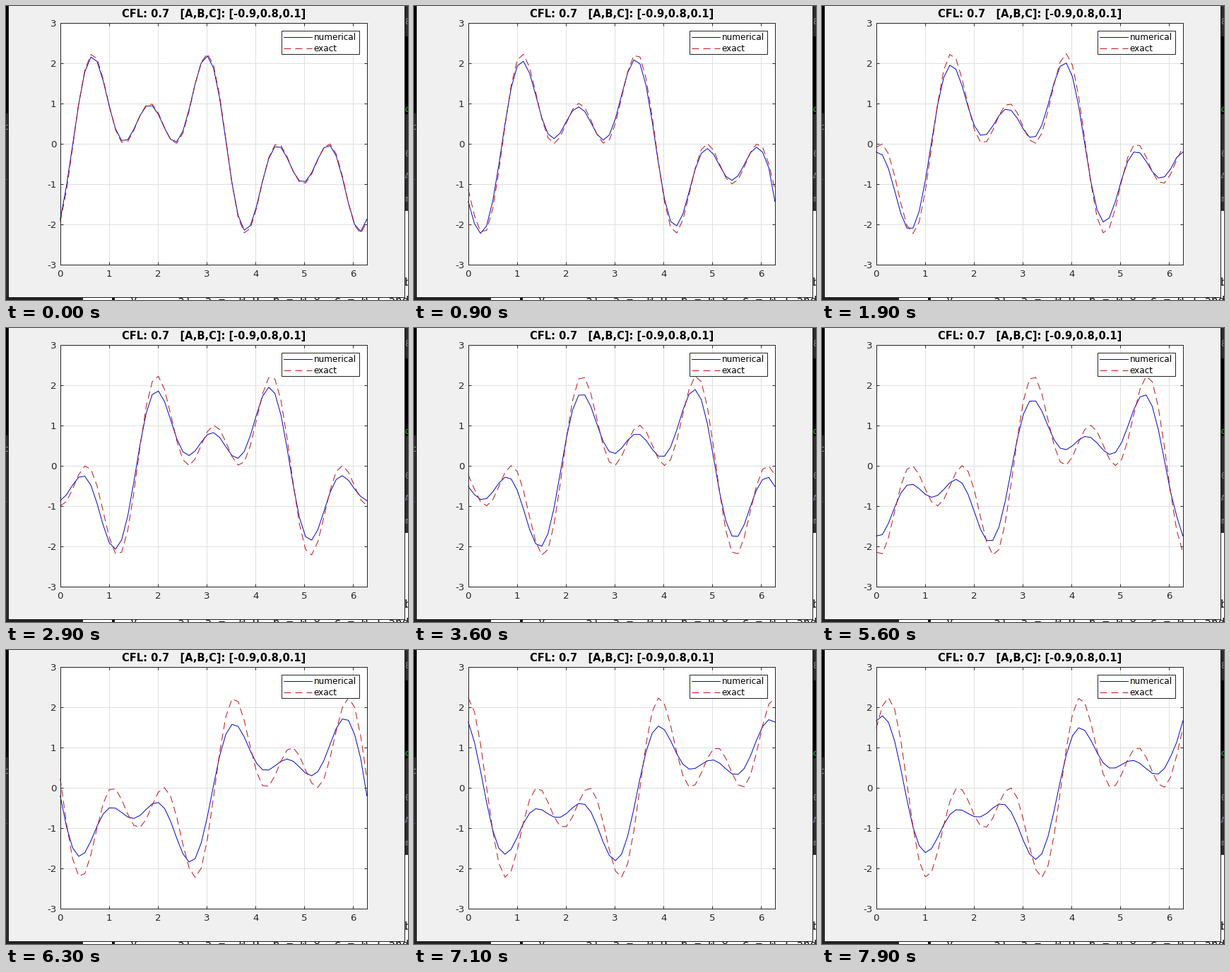
Recreate the animation shown at these times as a matplotlib script. Size 569 px wide and 416 px high, loop 8 s.

```python
import numpy as np
import matplotlib.pyplot as plt
from matplotlib.animation import FuncAnimation
from matplotlib.patches import Rectangle

W, H = 569, 416
PT = 0.72  # points per pixel at 100 dpi
INK, GRID, PANEL = "#262626", "#dfdfdf", "#f0f0f0"
BLUE, RED = "#0606c4", "#bc141c"
DASH = (0, (10, 6))

plt.rcParams.update({
    "font.family": "DejaVu Sans",
    "axes.unicode_minus": False,
    "lines.dash_capstyle": "butt",
})

# Advection scheme
CELLS, CFL = 50, 0.7
A, B, C = -0.9, 0.8, 0.1
x = np.linspace(0, 2 * np.pi, CELLS + 1)
dx = x[1]


def wave(v):
    return np.sin(v) + np.sin(3 * v) + np.sin(5 * v)


def advance(u):
    """One step; the cell past the right end counts as zero."""
    right = np.append(u[2:], 0)
    new = u.copy()
    new[1:] = u[1:] - CFL * (A * u[:-1] + B * u[1:] + C * right)
    new[0] = new[-1]
    return new


FIRST, LAST = 3, 43
states = [wave(x)]
for _ in range(LAST):
    states.append(advance(states[-1]))

# Screen updates in tenths of a second; some show two steps at once
updates = [1, *range(5, 20, 2), 22, 24, 26, 28, 29, 32, 34, 36, 38,
           42, 44, 46, 48, 52, 54, 56, 58, 59, 62, 63, *range(67, 76, 2), 79]
double = {5, 32, 42, 52, 67}


def step_at(tick):
    return FIRST + sum(1 + (t in double) for t in updates if t <= tick)


fig = plt.figure(figsize=(W / 100, H / 100), dpi=100, facecolor=PANEL)


def pixel_axes(z):
    a = fig.add_axes([0, 0, 1, 1], zorder=z)
    a.set(xlim=(0, W), ylim=(H, 0))
    a.axis("off")
    return a


def rect(a, x0, y0, x1, y1, color, z=1, edge=None):
    a.add_patch(Rectangle((x0, y0), x1 - x0, y1 - y0, fc=color,
                          ec=edge or "none", lw=PT if edge else 0, zorder=z))


def label(a, px, py, s, size, **kw):
    a.text(px, py, s, fontsize=size * PT, va="baseline", **kw)


# Desktop behind the window
back = pixel_axes(0)
rect(back, 0, 0, 5, 152, "#000000")
rect(back, 0, 152, 5, H, "#2b2b2b")
rect(back, 563, 0, W, 43, "#2b2b2b")
rect(back, 563, 43, W, 153, "#000000")
rect(back, 563, 153, W, 290, "#2b2b2b")
rect(back, 563, 290, W, H, "#ffffff")
rect(back, 0, 411, 109, H, "#222222")
rect(back, 109, 411, W, H, "#ffffff")
mono = dict(family="DejaVu Sans Mono", zorder=2)
label(back, 243, 421, "a), a = -0.9, b = 0.8, c = 0.1 and", 16, color="#111111", **mono)
label(back, 175, 421, "y", 16, color="#111111", **mono)
rect(back, 150, 412, 154, H, "#111111", 2)
label(back, 564, 396, "b", 16, color="#111111", **mono)
for py, s, color in [(26, "8", "#808080"), (150, "c", "#20c020"),
                     (213, "0", "#808080"), (245, "A", "#707890"),
                     (277, "m", "#909090")]:
    label(back, 564, py, s, 13, color=color, **mono)
label(back, -4, 175, "c", 13, color="#a0a0a0", **mono)
label(back, -5, 246, "l", 13, color="#5060a0", **mono)
rect(back, 3, 0, 565, 413, "#202020", 3)
rect(back, 4, 0, 564, 412, PANEL, 4)

# Plot
LEFT, BOTTOM, WIDTH, HEIGHT = 76.8, 50.2, 434, 342.2
ax = fig.add_axes([LEFT / W, BOTTOM / H, WIDTH / W, HEIGHT / H], zorder=1)
ax.set(xlim=(0, 2 * np.pi), ylim=(-3, 3), xticks=range(7), yticks=range(-3, 4))
ax.set_axisbelow(True)
ax.grid(color=GRID, lw=PT)
ax.tick_params(direction="in", top=True, right=True, length=4 * PT, width=PT,
               color=INK, labelcolor=INK, labelsize=13.33 * PT)
ax.tick_params(axis="x", pad=7.4 * PT)
ax.tick_params(axis="y", pad=5.3 * PT)
for side in ax.spines.values():
    side.set(color=INK, linewidth=PT)
# Unclipped so the half-pixel overhang at the edges stays visible
numerical, = ax.plot([], [], color=BLUE, lw=PT, clip_on=False)
exact, = ax.plot([], [], color=RED, lw=PT, ls=DASH, clip_on=False)

# Title and legend
front = pixel_axes(2)
label(front, 294, 16, "CFL: 0.7   [A,B,C]: [-0.9,0.8,0.1]", 14.67,
      weight="bold", ha="center")
rect(front, 389.8, 34.8, 499.8, 67.8, "#ffffff", 1, INK)
for py, s, color, ls in [(43.8, "numerical", BLUE, "-"), (59.8, "exact", RED, DASH)]:
    front.plot([393, 433], [py, py], color=color, lw=PT, ls=ls)
    label(front, 435.6, py + 4.2, s, 12)


def draw(tick):
    n = step_at(tick)
    numerical.set_data(x, states[n])
    exact.set_data(x, wave(x - CFL * dx * n))
    return numerical, exact


anim = FuncAnimation(fig, draw, frames=80, interval=100, repeat=True,
                     repeat_delay=0, blit=False)
plt.show()
```
